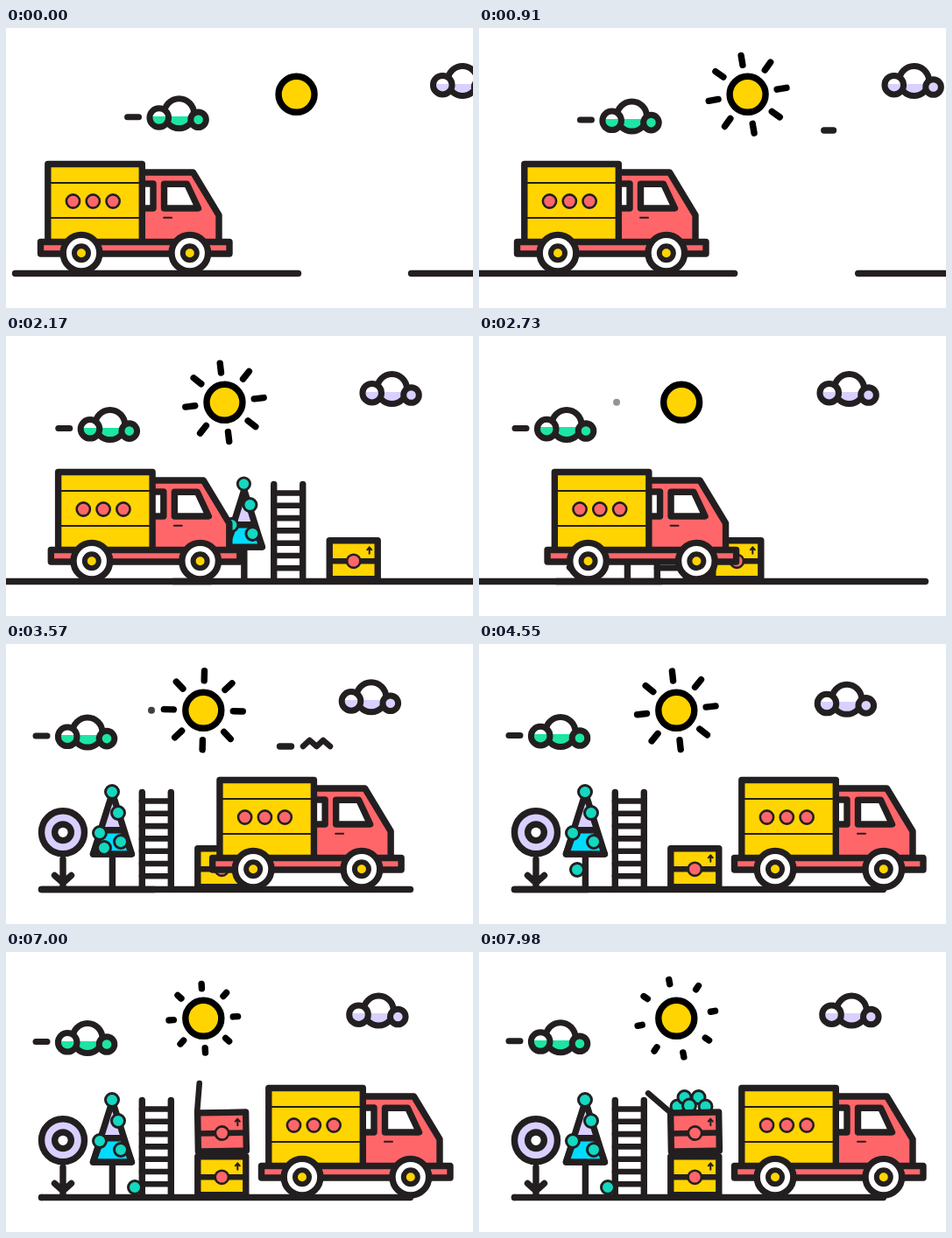
Animation, 533 px wide and 320 px high, one loop 8 s. Source, as an HTML page:

```html
<!DOCTYPE html>
<html lang="en">
<head>
<meta charset="utf-8">
<title>Delivery truck</title>
<style>
  html, body { margin: 0; width: 100%; height: 100%; overflow: hidden; background: #fff; }
  svg { display: block; width: 533px; height: 320px; }
  .ink { stroke: #231f20; stroke-width: 7.4; stroke-linecap: round; stroke-linejoin: round; fill: none; }
  .ink .thin { stroke-width: 2; }
  .ink .mid { stroke-width: 6.6; }
  .yellow { fill: #ffd400; }
  .red { fill: #ff666a; }
  .lilac { fill: #d9d0ff; }
  .cyan { fill: #00dcff; }
  .white { fill: #fff; }
  .badge { fill: #ff666a; stroke-width: 2.6; }
  .fruit { fill: #14d8c0; stroke-width: 3; }
</style>
</head>
<body>
<svg id="stage" viewBox="0 0 533 320"></svg>
<script>
const LOOP = 8000, STEP = 70;
const { PI, sin, cos, exp, min, max } = Math;

// Timing rules: 0 to 1 between two times, and a damped bounce that settles on 1.
const ramp = (t, from, to) => min(1, max(0, (t - from) / (to - from)));
const smooth = (t, from, to) => { const u = ramp(t, from, to); return u * u * (3 - 2 * u); };
const spring = (t, start, damping) => {
  const s = max(0, t - start) / 1000;
  return 1 - exp(-damping * s) * cos(s * PI / .4);
};

const line = (x1, y1, x2, y2, cls = '') => `<path class="${cls}" d="M${x1} ${y1}L${x2} ${y2}"/>`;
const badge = (x, y) => `<circle class="badge" cx="${x}" cy="${y}" r="7.6"/>`;
const repeat = (n, part) => Array.from({ length: n }, (_, i) => part(i)).join('');
const wheel = x => `<g transform="translate(${x} 257.2)"><circle class="white" r="20.8"/>
  <circle class="yellow" r="8" stroke-width="6"/></g>`;

function cloud(id, color) {
  return `<linearGradient id="${id}Fill" gradientUnits="userSpaceOnUse" x1="0" y1="0" x2="0" y2="6">
      <stop offset=".5" stop-color="#fff"/><stop offset=".5" stop-color="${color}"/></linearGradient>
    <g id="${id}" fill="url(#${id}Fill)" stroke-width="7">
      <circle r="17"/><circle cx="-22.8" cy="4.7" r="10.8"/>
      <circle cx="22" cy="7" r="8.8" fill="${color}"/>
      ${id === 'green' ? line(-59, 4, -46, 4) : ''}</g>`;
}
function crate(fill) {
  return `<rect class="${fill}" x="-27.5" y="-22" width="55" height="44"/>
    ${line(-27, 1.5, 27, 1.5, 'mid')}
    <path class="thin" d="M18 -7V-14M15.5 -11.5L18 -14.5L20.5 -11.5"/>
    ${badge(0, 1.5)}`;
}

const treeSpots = [[107, 216], [131, 226], [128, 193], [121, 169]];
const pileSpot = i => i < 4
  ? [242.5 - 16 * cos(i * PI / 3), 176.5 - 12 * sin(i * PI / 3)]
  : [240, 175.5];
const fruit = () => '<circle class="fruit" r="7.5"/>';

document.getElementById('stage').innerHTML = `
<g class="ink">
  <g id="sun" stroke="#000"><circle class="yellow" r="20.5"/><path id="rays"/></g>
  <circle id="speck" cy="75.8" r="4" fill="#231f20" stroke="none"/>
  <g id="bird">
    <path id="trail"/>
    <path id="wings" pathLength="100" stroke-width="6.5" d="M339 117L346.5 110L354.5 117L362 110L370 117"/>
  </g>
  ${cloud('green', '#1de5a5')}
  ${cloud('lilac', '#d9d0ff')}
  <path id="road"/>
  <g id="world">
    ${line(40.5, 280.5, 461.5, 280.5)}
    <path id="stem"/>
    <g id="disc"><circle class="lilac" id="plate" cx="65" cy="215.3"/>
      <circle class="white" cx="65" cy="215.3" r="9.3"/></g>
    <g id="cone"><path id="trunk"/><path id="top" class="lilac"/><path id="skirt" class="cyan"/></g>
    ${line(155.3, 169.5, 155.3, 280)}${line(188.3, 169.5, 188.3, 280)}
    ${repeat(7, i => line(155, 179.5 + i * 14.3, 188, 179.5 + i * 14.3, 'mid'))}
    <g id="treeFruit">${repeat(4, fruit)}</g>
    <circle class="fruit" id="drop" r="7.5"/>
    <g transform="translate(246.3 255.8)">${crate('yellow')}</g>
  </g>
  <g id="pile">${repeat(5, fruit)}</g>
  <g id="box">${crate('red')}<path id="lid" class="mid" d="M0 0H33"/></g>
  <g id="truck">
    <path class="red" d="M405 165H465.5L495 214V246H405Z"/>
    <rect class="white" x="400" y="178" width="20" height="28"/>
    <path class="white" d="M432.5 178.2H458.5L471.5 206H432.5Z"/>
    ${line(432, 216.8, 441, 216.8, 'thin')}
    <rect class="yellow" x="299.8" y="155.5" width="107.5" height="91"/>
    ${line(300, 177, 407, 177, 'thin')}${line(300, 217, 407, 217, 'thin')}
    ${repeat(3, i => badge(328.5 + 22.8 * i, 198))}
    <rect class="red" x="291.5" y="244.5" width="215.5" height="13.5"/>
    ${wheel(338)}${wheel(461.8)}
  </g>
</g>`;

const el = {};
document.querySelectorAll('#stage [id]').forEach(node => el[node.id] = node);
const set = (id, attr, value) => el[id].setAttribute(attr, value);
const move = (id, x, y = 0, rest = '') => set(id, 'transform', `translate(${x} ${y}) ${rest}`);
const show = (id, on) => set(id, 'visibility', on ? 'visible' : 'hidden');

function drawSky(t) {
  const glide = smooth(t, -167, 3209), left = 107 * (1 - glide);

  const phase = t % 1350;
  const outer = 34 + 11 * ramp(phase, 60, 450), inner = 34 + 11 * ramp(phase, 1100, 1345);
  set('rays', 'd', repeat(8, i => {
    const c = cos(i * PI / 4), s = sin(i * PI / 4);
    return `M${inner * c} ${inner * s}L${outer * c} ${outer * s}`;
  }));
  set('rays', 'transform', `rotate(${1.5 + .038 * (t - 3570)})`);
  show('rays', outer > inner);
  move('sun', 225.3 + left, 75.8);

  const blink = (from, to) => .85 * ramp(t, from, from + 300) * (1 - ramp(t, to - 250, to));
  set('speck', 'cx', 157 + 9 * smooth(t, 2700, 3300));
  set('speck', 'opacity', blink(2560, 3850) + blink(5650, 6350));

  move('green', 198 - 105 * smooth(t, -131, 3267), 97.8 + 3.8 * sin(PI * (t / LOOP) ** .5));
  move('lilac', 521.8 - 105 * glide + 8.5 * smooth(t, 3570, 6020), 60.5 + 6.5 * smooth(t, 3300, 6020));
  drawBird(t, left);
}

function drawBird(t, left) {
  const phase = (t + 2680) % 2500 - 1250;
  const head = ramp(phase, -350, -120), tail = ramp(phase, 350, 680);
  set('trail', 'd', `M${312.5 + 13 * tail} 117H${312.5 + 13 * head}`);
  show('trail', head > tail);
  const span = 100 * ramp(phase, -100, 0) * (1 - ramp(phase, 250, 400));
  set('wings', 'stroke-dasharray', `${span} 300`);
  set('wings', 'stroke-dashoffset', span / 2 - 50);
  show('wings', span > 1);
  move('bird', left);
}

function drawTrees(t) {
  const size = spring(t, 1280, 3.5);
  set('plate', 'r', 24.5 * size);
  set('plate', 'stroke-width', 7.4 + 8 * max(0, size - 1));
  show('disc', size > .4);
  set('stem', 'd', `M65 ${280 - 34 * smooth(t, 900, 1350)}V277M55.5 264.5L65 273L74.5 264.5`);
  show('stem', t > 1100);

  // Squash and stretch: the cone narrows and lifts as it grows tall.
  const grow = spring(t, 1280, 2.7);
  const h = 70 * grow, w = 22 * min(grow, grow ** -.4), base = 240 - 16 * (grow - 1);
  const cut = base - .39 * h;
  set('top', 'd', `M121.4 ${base - h}l${w} ${h}h${-2 * w}Z`);
  set('skirt', 'd', `M${121.4 - .56 * w} ${cut}h${1.12 * w}L${121.4 + w} ${base}h${-2 * w}Z`);
  set('trunk', 'd', `M121.4 ${base}V278`);
  show('cone', grow > .05);

  const fall = ramp(t, 4330, 4594), roll = smooth(t, 4560, 5900);
  move('drop', 112 + 35 * roll, 233 + 36 * fall * fall, `scale(${pop(t, 2250)})`);
}

const pop = (t, start) => t < start ? 0 : smooth(t, start, start + 170) + .2 * sin(PI * ramp(t, start + 100, start + 300));

function drawFruits(id, spot, count, start, gap, t) {
  for (let i = 0; i < count; i++) {
    const [x, y] = spot(i);
    el[id].children[i].setAttribute('transform', `translate(${x} ${y}) scale(${pop(t, start + gap * i)})`);
  }
}

function drawBox(t) {
  const p = smooth(t, 5900, 6600);
  move('box', 319 - 72.5 * p, 203 + 2.5 * p - 30 * sin(PI * p * p),
    `rotate(${-1 - 11 * (1 - p)}) scale(${.6 + .4 * p})`);
  show('box', t > 5800);
  move('lid', -28, -23, `rotate(${-138 * spring(t, 6900, 6)})`);
}

function draw(t) {
  drawSky(t);
  drawTrees(t);
  drawBox(t);
  drawFruits('treeFruit', i => treeSpots[i], 4, 1500, 180, t);
  drawFruits('pile', pileSpot, 5, 7180, 70, t);

  const drift = -.046 * t;
  const roadLeft = max(-12, 10.5 + drift) + 52.5 * smooth(t, 3000, 3570);
  set('road', 'd', `M${roadLeft} 280.5H${max(roadLeft, 333.5 + drift)}`);
  move('world', 422 * (1 - smooth(t, 439, 3339)));
  move('truck', -252 + 12 * smooth(t, 0, 2345) + 240 * smooth(t, 2368, 4118));
}

const start = performance.now();
function tick() {
  const t = (performance.now() - start) % LOOP;
  draw(Math.floor(t / STEP) * STEP);
  requestAnimationFrame(tick);
}
tick();
</script>
</body>
</html>
```
